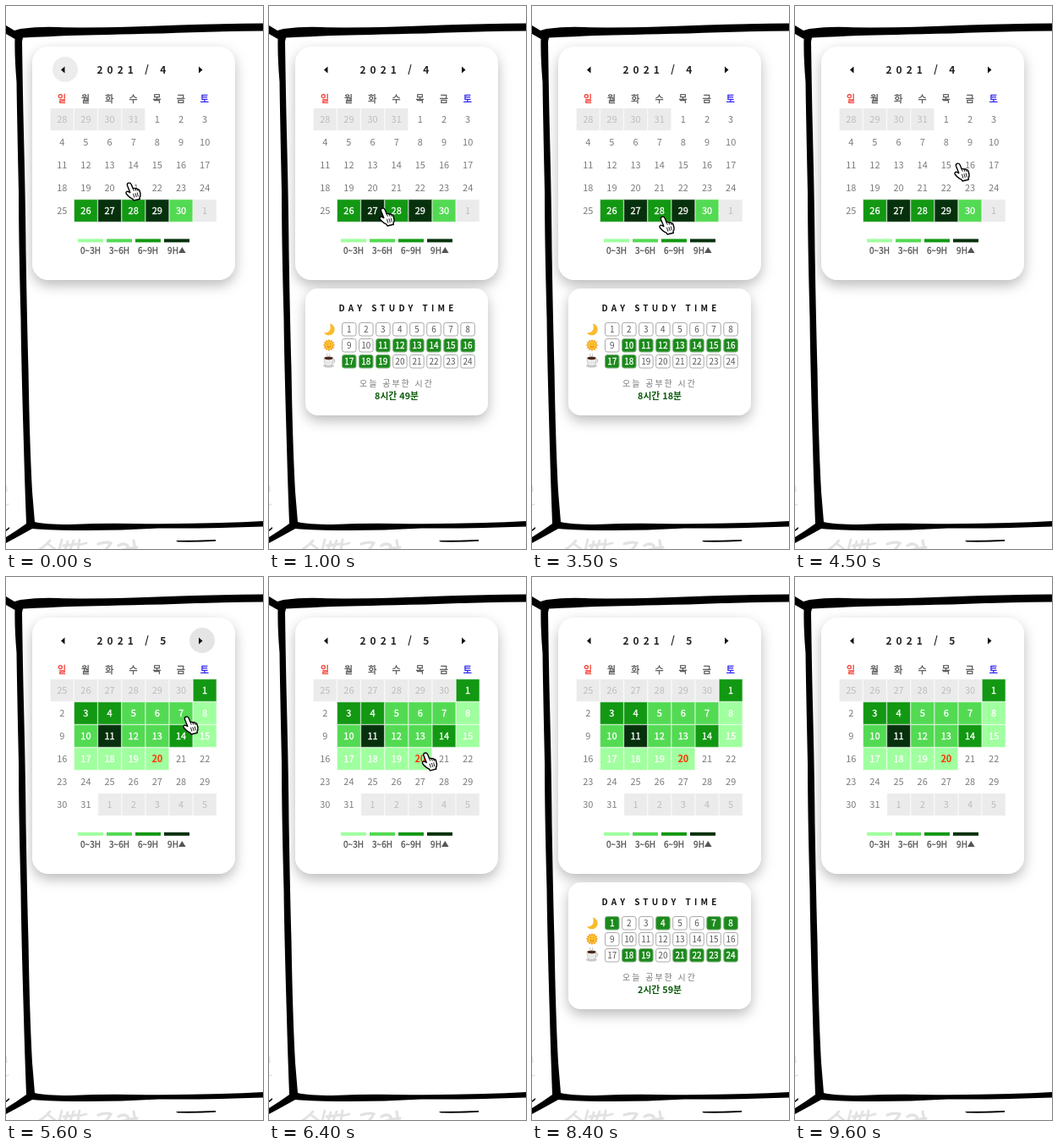
Recreate the animation shown at these times as an HTML page. Size 304x642 px, loop 9700 ms.

```html
<!DOCTYPE html>
<html lang="ko">
<head>
<meta charset="utf-8">
<title>Study calendar</title>
<style>
html, body { margin: 0; width: 100%; height: 100%; overflow: hidden; background: #fff; }
svg { display: block; width: 304px; height: 642px; }
text { font-family: "Noto Sans CJK KR", "Noto Sans CJK JP", "Noto Sans", sans-serif; }
</style>
</head>
<body>
<svg id="stage" viewBox="0 0 304 642" xmlns="http://www.w3.org/2000/svg">
  <defs>
    <filter id="shadow" filterUnits="userSpaceOnUse" x="0" y="10" width="304" height="560">
      <feDropShadow dx="0" dy="6" stdDeviation="7.5" flood-color="#000" flood-opacity=".27"/>
    </filter>
  </defs>
  <rect width="304" height="642" fill="#fff"/>
  <g fill="none" stroke="#e2e2e2" stroke-width="2.8" stroke-linecap="round">
    <path d="M52 632Q47 638 39 643M50 636L59 643M66 631L63 643M73 633L70 643M80 632L76 643M68 638L84 636M87 631L85 643M87 637L95 635"/>
    <path d="M109 636Q119 633 124 635Q121 640 118 643M133 638Q139 634 144 638Q145 643 138 643M151 632L153 643M146 641L155 640" stroke-width="3.2"/>
    <path d="M0 567L1 574M0 590L3 589" stroke-width="1.5"/>
  </g>
  <g fill="#000">
    <path d="M0 23L10 29L17 27Q40 24 62 25Q90 26 150 24.5Q240 21 304 20.5V29.5Q240 30 185 32.5Q110 34 75 35Q50 36 20 37.5L19 42Q20 110 21 150Q23 230 23.5 290Q25 380 26.5 430Q28 520 31 574L34 610Q45 613 75 613Q120 611 150 612Q230 613 304 609V615.5Q235 618 180 617.5Q100 622 37 618.5L31 618Q15 627 0 635V628Q13 620 24 612Q22 560 21 520Q18 420 17.5 370Q15 280 15 220Q13 130 12.5 90Q10 60 10.5 39L0 33Z"/>
    <path d="M201 632Q225 632 248 631V632.7Q225 634 203 633.5ZM0 619L4 616L4 618L0 621Z"/>
  </g>
</svg>
<script>
const NS = "http://www.w3.org/2000/svg";
const stage = document.getElementById("stage");
const LOOP = 9700, STEP = 100;
const LEVELS = ["none", "#a0ff9f", "#53da53", "#129812", "#06310c"];
const DAYS = "일월화수목금토";
const PITCH = 28.15, ROW = 27;

function add(parent, tag, attrs = {}, text) {
  const node = document.createElementNS(NS, tag);
  for (const k in attrs) node.setAttribute(k, attrs[k]);
  if (text !== undefined) node.textContent = text;
  parent.appendChild(node);
  return node;
}

// weight 500 is drawn as regular with a hairline outline
function setInk(node, fill, weight) {
  node.setAttribute("fill", fill);
  node.setAttribute("font-weight", weight == 500 ? 400 : weight);
  node.setAttribute("stroke", weight == 500 ? fill : "none");
}

function label(parent, x, y, text, size, fill, weight = 400, anchor = "middle", gap = 0) {
  const node = add(parent, "text", {
    x, y: y + size * .37, "font-size": size, "text-anchor": anchor,
    "letter-spacing": gap, "stroke-width": .3
  }, text);
  setInk(node, fill, weight);
  return node;
}

// lead: dates from the month before; levels: study level by date
function buildMonth(month, lead, count, rows, levels, today) {
  const g = add(stage, "g"), shift = (rows - 5) * ROW;
  add(g, "rect", { x: 31, y: 48, width: 240, height: 276 + shift, rx: 20, fill: "#fff", filter: "url(#shadow)" });
  g.prev = add(g, "circle", { cx: 70, cy: 75, r: 15, fill: "#e4e4e4" });
  g.next = add(g, "circle", { cx: 232, cy: 75, r: 15, fill: "#e4e4e4" });
  add(g, "path", { d: "M69.5 71.5V79.5L65 75.5ZM228 71.5V79.5L232.5 75.5Z", fill: "#111" });
  label(g, 107.5, 75.3, `2021 / ${month}`, 12, "#222", 700, "start", 5);
  [...DAYS].forEach((d, i) => label(g, 66 + PITCH * i, 110, d, 11, i == 0 ? "#f5372c" : i == 6 ? "#2a1cf0" : "#555", 500));

  for (let i = 0; i < rows * 7; i++) {
    const col = i % 7, row = Math.floor(i / 7), n = i - lead.length + 1;
    const out = n < 1 || n > count, level = out ? 0 : levels[n] || 0;
    const x = 52.2 + PITCH * col, y = 120.5 + ROW * row;
    if (out || level) {
      const paint = out ? "#ebebeb" : LEVELS[level];
      add(g, "rect", { x, y, width: PITCH, height: ROW, fill: paint, opacity: .35 });
      add(g, "rect", { x: x + .7, y: y + .7, width: PITCH - 1.4, height: ROW - 1.4, fill: paint });
    }
    const text = n < 1 ? lead[i] : out ? n - count : n;
    const fill = out ? "#bdbdbd" : n == today ? "#ff3300" : level ? "#fff" : "#7c7c7c";
    label(g, x + PITCH / 2, y + 13.5, text, 11, fill, n == today ? 700 : level ? 500 : 400);
  }

  ["0~3H", "3~6H", "6~9H", "9H"].forEach((s, i) => {
    add(g, "rect", { x: 85 + 34 * i, y: 275.4 + shift * .98, width: 30, height: 4, fill: LEVELS[i + 1] });
    label(g, i == 3 ? 197.5 : 100 + 34 * i, 289 + shift, s, 10, "#555", 500);
  });
  add(g, "path", { d: `M208.3 ${285 + shift}l4.3 7h-8.6z`, fill: "#555" });
  return g;
}

function range(from, to, level, map = {}) {
  for (let i = from; i <= to; i++) map[i] = level;
  return map;
}

const april = buildMonth(4, [28, 29, 30, 31], 30, 5, { 26: 3, 27: 4, 28: 3, 29: 4, 30: 2 });
const mayLevels = range(17, 20, 1, range(5, 7, 2, { 1: 3, 3: 3, 4: 3, 8: 1, 10: 2, 11: 4, 12: 2, 13: 2, 14: 3, 15: 1 }));
const may = buildMonth(5, [25, 26, 27, 28, 29, 30], 31, 6, mayLevels, 20);

const popup = add(stage, "g");
add(popup, "rect", { x: 43, y: 334, width: 216, height: 150, rx: 15, fill: "#fff", filter: "url(#shadow)" });
label(popup, 82.5, 357, "DAY STUDY TIME", 10, "#111", 700, "start", 4.2);

// moon, sun, coffee
add(popup, "path", { d: "M72 375.5A7 7 0 1 1 65 386.5Q75 386 72 375.5Z", fill: "#f8bd2c" });
const rays = Array.from({ length: 24 }, (_, i) => {
  const a = i * Math.PI / 12, r = i % 2 ? 5.2 : 7.3;
  return (71 + r * Math.cos(a)).toFixed(1) + "," + (401 + r * Math.sin(a)).toFixed(1);
});
add(popup, "polygon", { points: rays.join(" "), fill: "#f49a1c" });
add(popup, "circle", { cx: 71, cy: 401, r: 4.8, fill: "#ffc32f" });
add(popup, "path", { d: "M69.3 399.3v1M72.7 399.3v1M68.6 402.3q2.4 2.4 4.8 0", fill: "none", stroke: "#b96a12", "stroke-width": .8 });
add(popup, "ellipse", { cx: 70.5, cy: 425.5, rx: 6.5, ry: 2, fill: "#c9c9c9" });
add(popup, "path", { d: "M65 416h11q0 9-3.5 9.5h-4Q65 425 65 416Z", fill: "#e9e9e9", stroke: "#aaa", "stroke-width": .5 });
add(popup, "path", { d: "M75.5 418q3-.5 2.3 2t-3 2", fill: "none", stroke: "#bbb" });
add(popup, "ellipse", { cx: 70.5, cy: 416.3, rx: 5, ry: 1.9, fill: "#4a2a1c" });
add(popup, "path", { d: "M69 414q-1-1.5 0-3M72 414q-1-1.5 0-3", fill: "none", stroke: "#aaa", "stroke-width": .8 });

const hours = Array.from({ length: 24 }, (_, i) => {
  const x = 86.5 + 20.05 * (i % 8), y = 374.5 + 19 * Math.floor(i / 8);
  const box = add(popup, "rect", { x, y, width: 16.5, height: 15.5, rx: 2.5 });
  return { box, text: label(popup, x + 8.25, y + 7.7, i + 1, 10, "#555") };
});
label(popup, 107, 446, "오늘 공부한 시간", 10, "#777", 400, "start", 2);
const total = label(popup, 151, 461, "", 10.8, "#0b5a0b", 700);

const RECORDS = {
  a: ["8시간 49분", range(11, 19, 1)],
  b: ["9시간 24분", range(10, 19, 1)],
  c: ["8시간 18분", range(10, 18, 1)],
  d: ["2시간 59분", range(21, 24, 1, { 1: 1, 4: 1, 7: 1, 8: 1, 18: 1, 19: 1 })]
};

function fillPopup([time, on]) {
  total.textContent = time;
  hours.forEach(({ box, text }, i) => {
    const lit = on[i + 1];
    box.setAttribute("fill", lit ? "#1b8a1b" : "#fff");
    box.setAttribute("stroke", lit ? "#7fae7f" : "#aaa");
    setInk(text, lit ? "#fff" : "#555", lit ? 500 : 400);
  });
}

const hand = add(stage, "g");
add(hand, "path", {
  d: "M3.6 1.4Q6 .4 7.2 3L9.2 7.8Q10.6 6.8 11.9 8.1Q13.4 7.2 14.5 8.7Q16.4 8.2 17 10.2L18 14Q18.3 16.8 17 18.6L17.3 20.2L10 22L9 20.2Q5.5 19 1.4 14.2Q.3 12.1 2 11.3Q3.6 10.9 5.8 12.6L2.5 4.2Q1.9 2.2 3.6 1.4Z",
  fill: "#fff", stroke: "#000", "stroke-width": 1.4, "stroke-linejoin": "round"
});
add(hand, "path", {
  d: "M9.2 7.8l1 2.6M11.9 8.1l.9 2.3M14.5 8.7l.7 2M9.6 14.2l1.2 4M12 13.6l1.2 4M14.3 13l1 3.8",
  fill: "none", stroke: "#000", "stroke-width": .9, "stroke-linecap": "round"
});

// time, x, y
const PATH = [
  [0, 141, 208], [200, 141, 209], [700, 137, 235], [1000, 130, 238], [1500, 117, 241],
  [2100, 115, 242], [2800, 117, 243], [3200, 146, 247], [3500, 150, 248], [4100, 154, 246],
  [4500, 188, 185], [5000, 221, 79], [5100, 225, 72], [5400, 225, 72], [5600, 209, 164],
  [6100, 181, 205], [7000, 179, 212], [7200, 186, 215], [7700, 306, 170], [9700, 306, 170]
];
const ease = u => u * u * (3 - 2 * u);
const ramp = (t, from, to) => Math.min(1, Math.max(0, (t - from) / (to - from)));

function pointer(t) {
  const i = PATH.findIndex(p => p[0] > t);
  const [t0, x0, y0] = PATH[i - 1], [t1, x1, y1] = PATH[i];
  const u = ease((t - t0) / (t1 - t0));
  return [x0 + (x1 - x0) * u, y0 + (y1 - y0) * u];
}

const pulse = (t, on, off) => ramp(t, on, on + 200) * (1 - ramp(t, off, off + 200));
let shown;

function draw(t) {
  const second = t >= 5300;
  april.style.display = second ? "none" : "";
  may.style.display = second ? "" : "none";
  april.prev.setAttribute("opacity", .7 * (1 - ramp(t, 0, 300)));
  may.prev.setAttribute("opacity", 0);
  const hover = ramp(t, 5000, 5200) * (1 - ramp(t, 5600, 5900));
  april.next.setAttribute("opacity", hover);
  may.next.setAttribute("opacity", hover);

  const key = t < 2000 ? "a" : t < 3200 ? "b" : t < 5000 ? "c" : "d";
  if (key != shown) fillPopup(RECORDS[shown = key]);
  const alpha = pulse(t, 500, 1400) + pulse(t, 2500, 4300) + pulse(t, 6400, 8400);
  popup.setAttribute("opacity", alpha);
  popup.setAttribute("transform", `translate(0 ${second ? ROW : 0})`);
  hand.setAttribute("transform", `translate(${pointer(t)})`);
}

const start = performance.now();
function tick() {
  const t = (performance.now() - start) % LOOP;
  draw(Math.floor(t / STEP) * STEP);
  requestAnimationFrame(tick);
}
draw(0);
requestAnimationFrame(tick);
</script>
</body>
</html>
```
